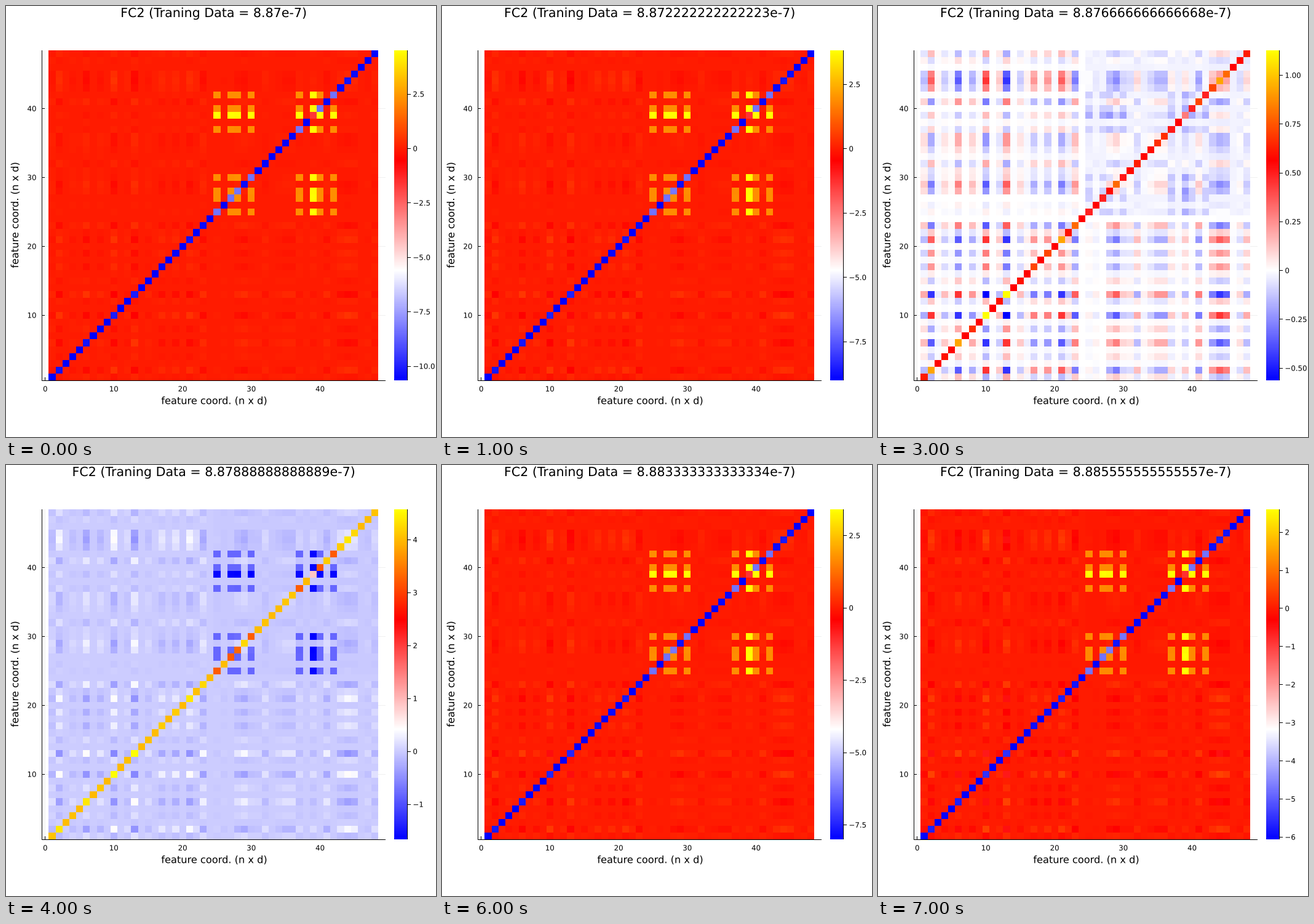
A matplotlib script for the animation above (8000 ms loop, 699 px wide and 700 px high).

```python
import math
import numpy as np
import matplotlib.pyplot as plt
from matplotlib.animation import FuncAnimation
from matplotlib.colors import LinearSegmentedColormap
from matplotlib.patches import PathPatch
from matplotlib.textpath import TextPath
from matplotlib.transforms import Affine2D

W, H, DPI = 699, 700, 64
PX = 72 / DPI                      # one pixel in points
N = 48
TOP, BOTTOM = 72, 608
SMALL, MEDIUM, LARGE = (1.4725 * pt for pt in (8, 11, 14))
CMAP = LinearSegmentedColormap.from_list("bwry", ["blue", "white", "red", "yellow"])

# diagonal strength of the matrix at each step
STRENGTH = [-10.65, -9.0, 16.43, 0.565, 4.01, 9.15, -8.0, -6.06]

# signed coordinates of the background mode, each tier weaker than the last
TIERS = [
    (10, -13),
    (2, -6, 21, 44),
    (-23, -29, 45),
    (17, 19, -41, 43),
    (-8, -28, -35, -36),
    (-1, 32, 48),
    (-4, 12, -15, 22, 39),
    (-30, -34, 37),
    (-31, -47),
]


def background():
    mode = np.random.default_rng(4).normal(0, 0.03, N)
    for tier, members in enumerate(TIERS):
        for m in members:
            mode[abs(m) - 1] = math.copysign(0.75 * 0.8 ** tier, m)
    q = np.outer(mode, mode)
    q[24:, 24:] = 0.8 * q[24:, 24:] - 0.025
    np.fill_diagonal(q, mode ** 2)
    return q


def coupling():
    group = np.zeros(N)
    for m in (25, 27, 28, 30):
        group[[m - 1, m + 11]] = 1
    group[38] = 2                  # the strongest member
    return np.outer(group, group)


BACK, COUPLING = background(), coupling()


def matrix(s):
    return BACK + s * np.eye(N) - (0.208 * s - 0.04) * COUPLING


def title_for(i):
    # evenly spaced values, with one unit of rounding in the last digit
    digits = str(887 * 10**13 + round(2e13 * i / 9) + (i > 0))
    return f"FC2 (Traning Data = 8.{digits[1:].rstrip('0')}e-7)"


fig = plt.figure(figsize=(W / DPI, H / DPI), dpi=DPI, facecolor="white")
ax = fig.add_axes([0, 0, 1, 1])


def line(x0, y0, x1, y1, z=1, alpha=1):
    """One pixel wide line, centred on the pixel grid."""
    if x0 == x1:
        x0 = x1 = math.floor(x0) + 0.5
    else:
        y0 = y1 = math.floor(y0) + 0.5
    return ax.plot([x0, x1], [y0, y1], color="black", lw=PX, alpha=alpha,
                   solid_capstyle="butt", zorder=z, snap=False)[0]


def text(x, y, s, size, align="center", angle=0):
    path = TextPath((0, 0), s, size=size, prop={"family": "DejaVu Sans"})
    box = path.get_extents()
    shift = {"left": 0, "center": (box.x0 + box.x1) / 2, "right": box.x1}[align]
    move = (Affine2D().translate(-shift, 0).scale(1, -1)
            .rotate_deg(-angle).translate(x, y))
    return ax.add_patch(PathPatch(move.transform_path(path), fc="black", lw=0,
                                  zorder=5, snap=False))


def mesh(x, y, values):
    return ax.pcolormesh(x, y, values, cmap=CMAP, antialiased=False,
                         linewidth=0, zorder=3)


def edge_x(k):
    return 69.4 + 11.1667 * k


def edge_y(k):
    return 608.51 - 11.1885 * k


# heatmap and colour bar
edges = np.arange(N + 1)
heat = mesh(np.rint(edge_x(edges)),
            np.clip(np.rint(edge_y(edges)), TOP, BOTTOM), matrix(1))
mesh([631, 652], np.linspace(BOTTOM, TOP, 257), np.arange(256)[:, None])

# grid, axes and fixed labels
for v in range(0, 41, 10):
    x, y = edge_x(v - 0.5), edge_y(v - 0.5)
    line(x, TOP, x, BOTTOM, 0, 0.06)
    line(x, 603, x, BOTTOM)
    text(x, 626, str(v), SMALL)
    if v:
        line(58, y, 617, y, 0, 0.06)
        line(58, y, 63, y)
        text(48.7, y + 4.3, str(v), SMALL, "right")
line(58, TOP, 58, 609, 4)
line(58, 608, 617, 608, 4)
line(652, TOP, 652, BOTTOM, 4)
text(338, 646.5, "feature coord. (n x d)", MEDIUM)
text(20, 340, "feature coord. (n x d)", MEDIUM, angle=90)

ax.set_xlim(0, W)
ax.set_ylim(H, 0)
ax.set_autoscale_on(False)
ax.axis("off")

changing = []


def draw_ticks(lo, hi):
    span = hi - lo
    step = next(s for s in (0.1, 0.25, 0.5, 1, 2.5, 5) if span / s < 10)
    decimals = len(f"{step:g}".partition(".")[2])
    for k in range(math.ceil(lo / step), math.floor(hi / step) + 1):
        y = BOTTOM - (k * step - lo) / span * (BOTTOM - TOP)
        label = f"{k * step:.{decimals}f}".replace("-", "\u2212") if k else "0"
        changing.append(line(652, y, 658, y, 4))
        changing.append(text(661.4, y + 4.3, label, SMALL, "left"))


def update(i):
    while changing:
        changing.pop().remove()
    values = matrix(STRENGTH[i])
    lo, hi = values.min(), values.max()
    heat.set_array(values)
    heat.set_clim(lo, hi)
    draw_ticks(lo, hi)
    changing.append(text(337.75, 18, title_for(i), LARGE))
    return []


anim = FuncAnimation(fig, update, frames=len(STRENGTH), interval=1000,
                     repeat=True, repeat_delay=0, blit=False)
plt.show()
```
